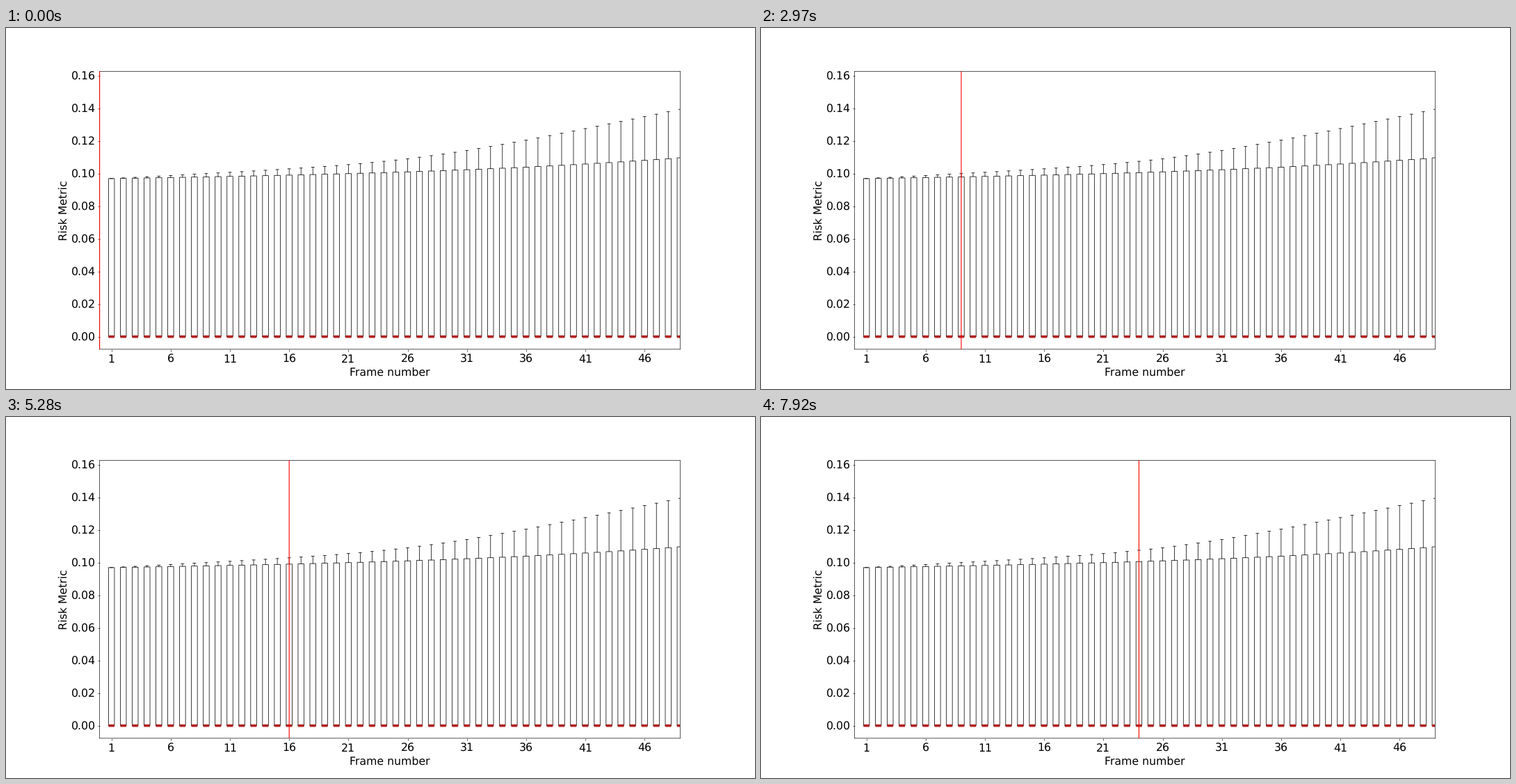
Recreate the animation shown at these times as a matplotlib script. Size 1077x520 px, loop 8000 ms.

```python
import numpy as np
import matplotlib.pyplot as plt
from matplotlib.animation import FuncAnimation

WIDTH, HEIGHT, DPI = 1077, 520, 64
LOOP_MS, TICK_MS, STEP_MS = 8000, 20, 330
PX = 72 / DPI  # points per pixel
BOX_HALF, CAP_HALF = 0.25, 0.125

plt.rcParams.update({
    "font.family": "DejaVu Sans",
    "font.size": 15.7 * PX,
    "text.hinting": "none",
})

# Box tops rise gently; whiskers bend from a slow to a fast linear rise.
x = np.arange(1, 50)
t = x - 1
quartile = 0.0969 + 1.28e-4 * t + 5.94e-8 * t**3
whisker = 0.0969 + 3.7e-4 * t + 1.13e-3 * 4.55 * np.log1p(np.exp((t - 26.2) / 4.55))

fig, ax = plt.subplots(figsize=(WIDTH / DPI, HEIGHT / DPI), dpi=DPI)
fig.subplots_adjust(left=0.125, right=0.9, bottom=0.11, top=0.88)


def strokes(xs, ys, width, color="black", cap="projecting"):
    """Draw the same polyline for every box, joined into a single artist."""
    gap = np.full(len(x), np.nan)
    px, py = (np.column_stack([np.broadcast_to(v, x.shape) for v in vals] + [gap])
              for vals in (xs, ys))
    ax.plot(px.ravel(), py.ravel(), color=color, lw=width * PX,
            snap=False, solid_capstyle=cap)


left, right = x - BOX_HALF, x + BOX_HALF
strokes([left, right, right, left, left], [0, 0, quartile, quartile, 0], 0.75)
strokes([x, x], [quartile, whisker], 0.75)
strokes([x - CAP_HALF, x + CAP_HALF], [whisker, whisker], 0.75)
strokes([left, right], [0, 0], 3.7, "firebrick", "butt")

ax.set_xlim(0, 49)
ax.set_ylim(-0.00775, 0.16264)
ax.set_xticks(range(1, 50, 5))
ax.set_yticks(np.arange(9) * 0.02)
ax.yaxis.set_major_formatter("{x:.2f}")
ax.tick_params(length=2.6 * PX, width=0.6 * PX)
ax.tick_params(axis="x", pad=4.5 * PX)
ax.tick_params(axis="y", pad=2.6 * PX)
ax.set_xlabel("Frame number", labelpad=3 * PX)
ax.set_ylabel("Risk Metric", labelpad=3 * PX)
for spine in ax.spines.values():
    spine.set(linewidth=0.65 * PX, snap=False)

cursor = ax.axvline(0, color="red", lw=1.1 * PX, zorder=10, clip_on=False,
                    snap=False, solid_capstyle="butt")


def update(i):
    step = (i * TICK_MS + TICK_MS // 2) // STEP_MS
    cursor.set_xdata([step, step])
    return (cursor,)


anim = FuncAnimation(fig, update, frames=LOOP_MS // TICK_MS,
                     interval=TICK_MS, repeat=True, repeat_delay=0)
plt.show()
```
